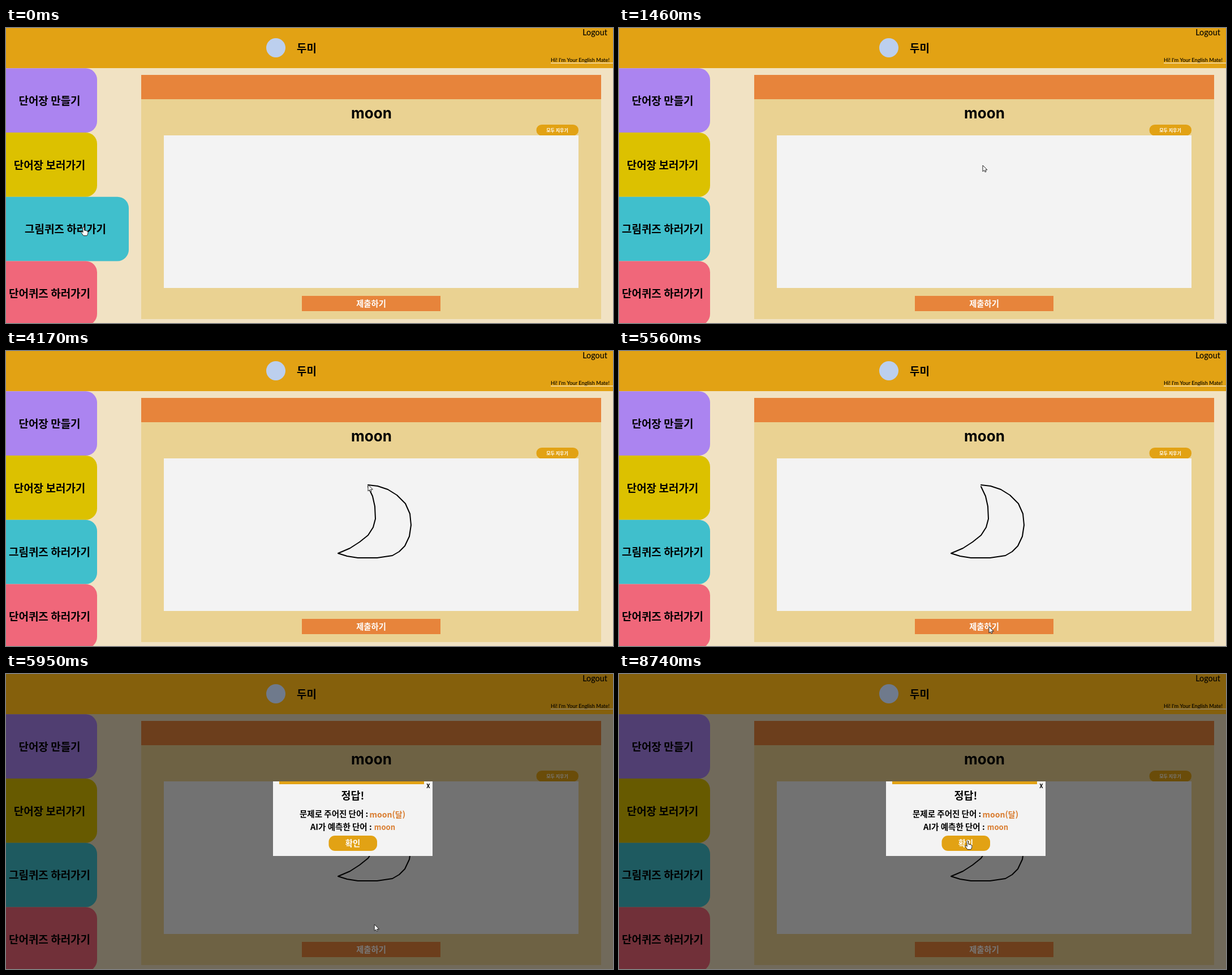
An HTML page with a canvas for the animation above (8.81 s loop, 1073x522 px).

```html
<!DOCTYPE html>
<html lang="ko">
<head>
<meta charset="utf-8">
<title>그림퀴즈</title>
<style>
html, body { margin: 0; width: 100%; height: 100%; overflow: hidden; background: #f1e2c3; }
canvas { display: block; }
</style>
</head>
<body>
<canvas id="stage" width="1073" height="522"></canvas>
<script>
const ctx = document.getElementById('stage').getContext('2d');
const LOOP = 8810;
const KR = '"Noto Sans CJK KR", "Noto Sans CJK", sans-serif';
const LATIN = 'Lato, sans-serif';
const GOLD = '#e2a214', ORANGE = '#e7843b', PAPER = '#f3f3f3';

const DRAW_START = 1500, DRAW_MID = 2840, DRAW_END = 3950;
const DIALOG_AT = 5620;

const moon = [
  [640, 240], [648, 257], [652, 275], [653, 297], [649, 312], [640, 326],
  [625, 338], [608, 349], [587, 358], [603, 363], [622, 366], [656, 366],
  [683, 362], [695, 355], [705, 345], [713, 328], [716, 308], [714, 288],
  [706, 270], [691, 255], [675, 245], [657, 239], [640, 237]
];
const MID_POINT = 13;

// Running length of the stroke at each point
const reach = [0];
for (let i = 1; i < moon.length; i++) {
  const [a, b] = [moon[i - 1], moon[i]];
  reach.push(reach[i - 1] + Math.hypot(b[0] - a[0], b[1] - a[1]));
}
const total = reach[reach.length - 1];

const menu = [
  ['단어장 만들기', '#ab84f0'],
  ['단어장 보러가기', '#dcc100'],
  ['그림퀴즈 하러가기', '#40bfcc'],
  ['단어퀴즈 하러가기', '#f0677a']
];

// Cursor stops outside the drawing phase: time, x, y
const stops = [
  [460, 137, 352], [1340, 643, 243], [1460, 643, 243], [DRAW_START, 640, 240],
  [DRAW_END, 640, 237], [4250, 640, 237], [5030, 654, 488],
  [5800, 654, 488], [6280, 642, 298], [7410, 642, 298], [8280, 616, 295]
];

const clamp = v => Math.max(0, Math.min(1, v));
const smooth = v => v * v * (3 - 2 * v);
const span = (t, from, to) => clamp((t - from) / (to - from));

function rect(x0, y0, x1, y1, color, radius = 0) {
  ctx.fillStyle = color;
  ctx.beginPath();
  ctx.roundRect(x0, y0, x1 - x0, y1 - y0, radius);
  ctx.fill();
}

function label(str, x, y, size, color = '#000', align = 'center', font = KR, weight = 700) {
  ctx.font = `${weight} ${size}px ${font}`;
  ctx.textAlign = align;
  ctx.fillStyle = color;
  ctx.fillText(str, x, y + size * 0.37);
}

function strokeLength(t) {
  const mid = reach[MID_POINT];
  return mid * span(t, DRAW_START, DRAW_MID) + (total - mid) * span(t, DRAW_MID, DRAW_END);
}

function pointAt(length) {
  const d = Math.min(length, total);
  let i = 1;
  while (i < moon.length - 1 && reach[i] < d) i++;
  const k = (d - reach[i - 1]) / (reach[i] - reach[i - 1]);
  return [0, 1].map(n => moon[i - 1][n] + (moon[i][n] - moon[i - 1][n]) * k);
}

function cursorAt(t) {
  if (t >= DRAW_START && t < DRAW_END) {
    const d = strokeLength(t);
    return pointAt(d + Math.min(10, d));
  }
  if (t <= stops[0][0]) return stops[0].slice(1);
  for (let i = 1; i < stops.length; i++) {
    const [a, b] = [stops[i - 1], stops[i]];
    if (t < b[0]) {
      const k = smooth(span(t, a[0], b[0]));
      return [a[1] + (b[1] - a[1]) * k, a[2] + (b[2] - a[2]) * k];
    }
  }
  return stops[stops.length - 1].slice(1);
}

function drawHeader() {
  rect(0, 0, 1073, 71, GOLD);
  ctx.fillStyle = '#bccfee';
  ctx.beginPath();
  ctx.arc(477, 35, 17, 0, Math.PI * 2);
  ctx.fill();
  label('두미', 531.5, 35.5, 19);
  label('Logout', 1041, 8, 14.3, '#000', 'center', LATIN, 500);
  label("Hi! I'm Your English Mate!", 1015, 56.5, 9.2, '#000', 'center', LATIN, 500);
  rect(963, 61.5, 1073, 62.5, '#fff');
}

function drawMenu(t) {
  const pulled = 1 - smooth(span(t, 700, 1000));
  menu.forEach(([name, color], i) => {
    const y = 71.3 + i * 113.7;
    const w = 161 + (i === 2 ? 56 * pulled : 0);
    rect(0, y, w, y + 113.7, color, [0, 20, 20, 0]);
    label(name, w / 2 - 3.5, y + 57.5, 19);
  });
}

function drawBoard(t) {
  rect(239, 83, 1052, 515, '#ead292');
  rect(239, 83, 1052, 126, ORANGE);
  label('moon', 646, 150.5, 26, '#000', 'center', 'Inter, sans-serif');
  rect(937.5, 171, 1012, 190.5, GOLD, 9.5);
  label('모두 지우기', 974.5, 181, 8, '#fff');
  rect(279, 190, 1012, 460, PAPER);
  rect(523, 474, 768, 501, ORANGE);
  label('제출하기', 645.5, 488, 14.3, '#fff');
  drawStroke(strokeLength(t));
}

function drawStroke(length) {
  if (length <= 0) return;
  ctx.strokeStyle = '#000';
  ctx.lineWidth = 2;
  ctx.lineCap = ctx.lineJoin = 'round';
  ctx.beginPath();
  moon.forEach((p, i) => { if (reach[i] <= length) ctx.lineTo(...p); });
  ctx.lineTo(...pointAt(length));
  ctx.stroke();
}

function drawDialog(t) {
  rect(0, 0, 1073, 71, 'rgba(0,0,0,.41)');
  rect(0, 71, 1073, 522, 'rgba(0,0,0,.53)');
  ctx.globalAlpha = 0.42 + 0.58 * span(t, DIALOG_AT, DIALOG_AT + 140);
  rect(472, 190, 754, 322, PAPER);
  rect(483, 190, 739, 195, GOLD);
  label('X', 746.5, 198, 10);
  label('정답!', 613, 215, 18.5);
  label('문제로 주어진 단어 :', 519, 248, 14.5, '#000', 'left');
  label('moon(달)', 706, 248.5, 14, '#d97c2f', 'right');
  label('AI가 예측한 단어 :', 538, 270.5, 14.5, '#000', 'left');
  label('moon', 688, 271, 13, '#d97c2f', 'right');
  rect(570.5, 286, 656, 313, GOLD, 11);
  label('확인', 613, 300, 14.3, '#fff');
  ctx.globalAlpha = 1;
}

function drawCursor(t) {
  const [x, y] = cursorAt(t);
  const overMenu = t < 1400 && x < 217;
  const overConfirm = t > DIALOG_AT && y < 313;
  const shape = overMenu || overConfirm
    ? 'M-1 1Q0-1 1.5 1V6L6 7Q8 7.5 8 10Q8 13 6 15.5H0L-4 10Q-4.5 8-2.5 8.5L-1 10Z'
    : 'M0 0V11L2.6 8.7L4.2 12L6 11.2L4.5 8H8Z';
  const path = new Path2D(shape);
  ctx.save();
  ctx.translate(x, y);
  ctx.fillStyle = '#fff';
  ctx.strokeStyle = '#222';
  ctx.lineWidth = 1;
  ctx.lineJoin = 'round';
  ctx.fill(path);
  ctx.stroke(path);
  ctx.restore();
}

function render(now) {
  const t = now % LOOP;
  rect(0, 0, 1073, 522, '#f1e2c3');
  drawHeader();
  drawMenu(t);
  drawBoard(t);
  if (t >= DIALOG_AT) drawDialog(t);
  drawCursor(t);
}

const start = performance.now();
function tick() {
  render(performance.now() - start);
  requestAnimationFrame(tick);
}
tick();
</script>
</body>
</html>
```
